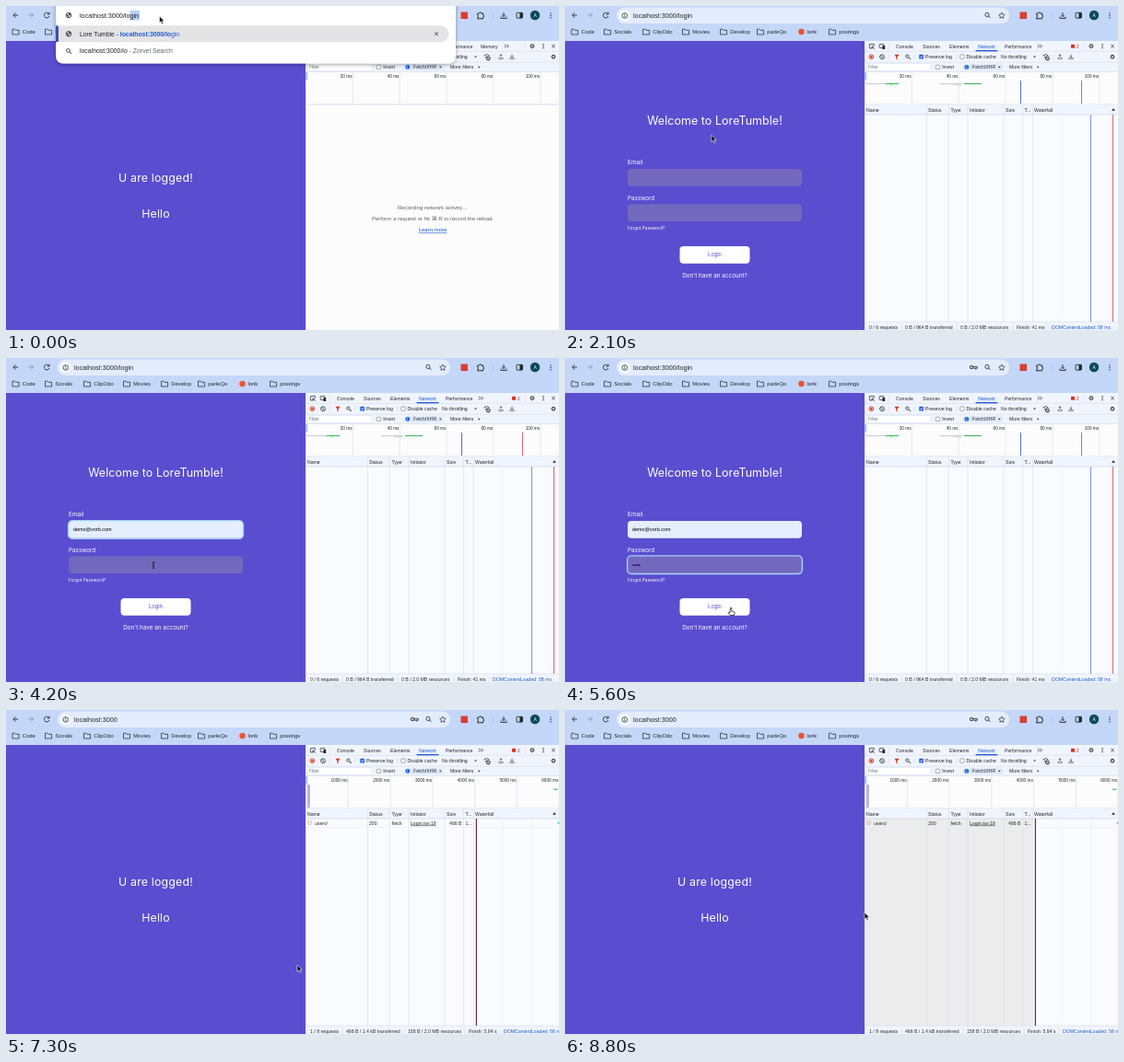
Recreate the animation shown at these times as an HTML page. Size 600 px wide and 352 px high, loop 8900 ms.

```html
<!DOCTYPE html>
<html lang="en">
<head>
<meta charset="utf-8">
<title>Login flow</title>
<style>
  html, body { margin: 0; width: 100%; height: 100%; overflow: hidden; }
  svg { display: block; width: 100vw; height: 100vh; }
  text { font-family: "Liberation Sans", Arial, sans-serif; white-space: pre; }
  .page text { font-family: Inter, "Open Sans", sans-serif; fill: #fff; }
</style>
</head>
<body>
<svg id="stage" viewBox="0 0 600 352" xmlns="http://www.w3.org/2000/svg"></svg>
<script>
const LOOP = 8900, STEP = 100;
const INK = '#26282c', BLUE = '#1a57d6', BAR = '#c4d7f8', EDGE = '#d3dcec';

// y is the vertical middle of the line of text
const text = (x, y, s, size = 5.15, fill = INK, more = '') =>
  `<text x="${x}" y="${y + size * .36}" font-size="${size}" fill="${fill}" ${more}>${s}</text>`;
const mid = 'text-anchor="middle"';
const rect = (x, y, w, h, fill, r = 0, more = '') =>
  `<rect x="${x}" y="${y}" width="${w}" height="${h}" fill="${fill}" rx="${r}" ${more}/>`;
const line = (d, stroke = INK, width = .8, more = '') =>
  `<path d="${d}" fill="none" stroke="${stroke}" stroke-width="${width}" ${more}/>`;
const shape = (d, fill, more = '') => `<path d="${d}" fill="${fill}" ${more}/>`;
const ring = (x, y, r, stroke = INK, width = .8, fill = 'none') =>
  `<circle cx="${x}" cy="${y}" r="${r}" fill="${fill}" stroke="${stroke}" stroke-width="${width}"/>`;
const dot = (x, y, r, fill = INK) => `<circle cx="${x}" cy="${y}" r="${r}" fill="${fill}"/>`;
const vline = (x, y1, y2, stroke = EDGE, width = .6) => line(`M${x} ${y1}V${y2}`, stroke, width);
const group = (id, body, cls = '') => `<g id="${id}" class="${cls}">${body}</g>`;

const kebab = (x, y, gap = 2.4) => [-gap, 0, gap].map(d => dot(x, y + d, .7)).join('');
const cross = (x, y, r) => line(`M${x - r} ${y - r}l${2 * r} ${2 * r}m0 ${-2 * r}l${-2 * r} ${2 * r}`);
const lens = (x, y, r = 1.9) =>
  ring(x - .6, y - .6, r) + line(`M${x + .8} ${y + .8}l2 2`, INK, 1);
const caret = (x, y) => shape(`M${x - 1.3} ${y - .8}h2.6l-1.3 1.8z`, INK);
const gear = (x, y) => ring(x, y, 1.9, INK, 1) + dot(x, y, .6);
const arrowTray = (x, y, dir, s = 1) =>
  line(`M${x} ${y - 2.8 * s}v${4 * s}M${x - 1.5 * s} ${y - (dir > 0 ? .3 : 1.3) * s}l${1.5 * s} ${1.5 * dir * s}l${1.5 * s} ${-1.5 * dir * s}M${x - 2.7 * s} ${y + 1.3 * s}v${1.5 * s}h${5.4 * s}v${-1.5 * s}`, INK, .8 * s);
const globe = (x, y) => ring(x, y, 2.8, '#3c4043', .9) +
  shape(`M${x - 2.6} ${y - 1}l2 .5l1 1.4l-1 1.6zM${x} ${y - 2.6}l2.4 1.4l-.8 1.6l-1.6-1z`, '#3c4043');
const checkbox = (x, y, on) => on
  ? rect(x - 2.4, y - 2.4, 4.8, 4.8, '#1b63e0', .9) + line(`M${x - 1.3} ${y}l1 1.1l1.8-2.2`, '#fff', .8)
  : rect(x - 2.2, y - 2.2, 4.4, 4.4, '#fff', .8, 'stroke="#777" stroke-width=".6"');
const folder = x =>
  line(`M${x} 25.2h2.5l1 1.1h3.6v4.7h-7.1z`, '#30343b', .8, 'stroke-linejoin="round"');

function browser() {
  const folders = [[7, 'Code'], [42.5, 'Socials'], [84.5, 'ClipOdo'], [127.5, 'Movies'],
    [168.5, 'Develop'], [208.5, 'parleQo'], [286.5, 'postings']];
  return rect(0, 0, 600, 38, BAR) + rect(56, 1.5, 426, 17.5, '#e3ecfc', 8.7) +
    line('M13 10H8M10.4 7.4L7.8 10l2.6 2.6', INK, .9) +
    line('M24.5 10h5M27 7.4l2.6 2.6L27 12.6', '#8c9bb8', .9) +
    line('M46.6 8.6a2.8 2.8 0 1 0 .3 2.4M47 6.8v2.2h-2.2', INK, .9) +
    dot(64.8, 10.5, 6, '#f8fbff') + ring(64.8, 10.5, 2.8) + vline(64.8, 10, 12, INK, .8) + dot(64.8, 9, .5) +
    lens(458.5, 10, 2.1) +
    line('M473.9 7l1 2.1 2.3.3-1.7 1.6.4 2.3-2-1.1-2 1.1.4-2.3-1.7-1.6 2.3-.3z', INK, .7) +
    rect(493.5, 6.5, 7.5, 7.5, '#dc3c32', .6) +
    line('M511.7 8h1.8a1.1 1.1 0 0 1 2.2 0h1.9v1.9a1.1 1.1 0 0 1 0 2.2v1.7h-5.9v-1.8a1 1 0 0 0 0-2z', INK, 1) +
    vline(528, 6, 14, '#a9c3ef', .8) + arrowTray(540, 10.2, 1, 1.15) +
    rect(554, 7.3, 6.4, 5.8, 'none', .7, `stroke="${INK}" stroke-width=".9"`) + rect(557.4, 7.3, 3, 5.8, INK) +
    dot(574, 10, 5.2, '#0d4a58') + text(574, 10, 'A', 4.8, '#fff', mid) + kebab(591, 10.3) +
    folders.map(([x, name]) => folder(x) + text(x + 10.8, 28, name, 5.9)).join('') +
    dot(256.5, 28, 3.3, '#e8583c') + text(262.5, 28, 'lorik', 5.9);
}

const keyIcon = ring(441, 10, 1.7, INK, .9) + line('M442.7 9.4h4.6v1.8h-4.4M445.8 11v1.4', INK, .8);

function suggestions() {
  const [dark, grey] = ['#202124', '#5f6368'];
  return rect(54, -12, 434, 74.5, '#fff', 8, 'filter="url(#soft)"') +
    globe(68, 10) + rect(134.4, 5, 10.6, 10.5, '#b5d3fb') + text(80, 10.5, 'localhost:3000/login', 7.25, dark) +
    shape('M54 21.3H471.5a9 9 0 0 1 0 18H54z', '#e4e4e6') + shape('M54 21.3h1a2 2 0 0 1 2 2v14a2 2 0 0 1-2 2h-1z', '#3c4fa8') +
    globe(68, 30.3) + cross(467, 30.3, 1.9) +
    text(80, 30.3, `Lore Tumble<tspan> - </tspan><tspan fill="${BLUE}"><tspan font-weight="bold">localhost:3000/lo</tspan>gin</tspan>`, 6.8, dark) +
    lens(68, 49) + text(80, 49, `localhost:3000/lo<tspan fill="${grey}"> - Zorvel Search</tspan>`, 6.9, dark);
}

const loggedPage = text(162.5, 187, 'U are logged!', 12.3, '#fff', mid + ' letter-spacing=".2"') +
  text(162.5, 226, 'Hello', 12.3, '#fff', mid + ' letter-spacing=".2"');

const loginPage = text(162.5, 125, 'Welcome to LoreTumble!', 12.4, '#fff', mid + ' letter-spacing=".1"') +
  text(68, 170, 'Email', 6.5) + text(68, 208.5, 'Password', 6.3) +
  [177, 215.3].map(y => rect(68, y, 189, 18.8, '#7468be', 4)).join('') +
  text(68, 241.7, 'Forgot Password?', 4.75) +
  rect(124.5, 261, 76, 18.8, '#fff', 4) +
  text(162.5, 270.3, 'Login', 5.7, '', mid + ' style="fill:#5a4dd0"') +
  text(162.5, 292.5, "Don't have an account?", 6.35, '', mid);

const focusRing = y => rect(67.6, y - .4, 189.8, 19.6, 'none', 4.4, 'stroke="#a9d2fb" stroke-width="1.4"');
const filled = s => rect(68, 177, 189, 18.8, '#e4eefd', 4) + text(73, 186.3, s, 5.45, '#000');

function autofill() {
  return shape('M120.5 200.3l4.5-4.5l4.5 4.5z', '#fff') +
    rect(115, 199.7, 85, 38.3, '#fff', 2.5, 'filter="url(#soft)"') + rect(115, 202.3, 85, 16.6, '#e9e9eb') +
    text(121, 210.7, 'melora4073@vintu.com', 6.3) + text(121, 228, 'demo@vorb.com', 6.3);
}

function toolsFrame() {
  const tabs = [[359, 'Console'], [388, 'Sources'], [417, 'Elements'], [477, 'Performance']];
  return rect(325.3, 38, 274.7, 314, '#fcfcfd') + rect(325.3, 38, 274.7, 33.5, '#f0f4fc') +
    [49.3, 61.3, 71.5].map(y => line(`M325.3 ${y}H600`, EDGE, .6)).join('') +
    line('M334 46h-3.6v-4.6h5v2M333 44l3.2 2.8M333 44v2M333 44h2', INK, .7) +
    rect(341.2, 41.5, 4.8, 4, 'none', .4, `stroke="${INK}" stroke-width=".7"`) + rect(344.4, 43, 2.8, 4, INK, .4) +
    vline(351.5, 40.5, 47.5) +
    tabs.map(([x, s]) => text(x, 43.8, s)).join('') + text(448, 43.8, 'Network', 5.15, BLUE) + rect(445.5, 48, 24, 1.3, BLUE) +
    vline(563.5, 40.5, 47.5) + gear(571, 43.6) + kebab(583, 43.6, 1.9) + cross(594, 43.6, 1.6) +
    ring(332.3, 55.2, 2.4, '#d93025', .9) + dot(332.3, 55.2, 1.2, '#d93025') +
    ring(344, 55.2, 2.4) + line('M342.3 53.5l3.4 3.4') + vline(351.5, 52, 58.5) +
    shape('M357.5 52.8h5l-1.9 2.6v2.6h-1.2v-2.6z', '#d93025') + lens(372, 55.2, 1.6) + vline(379, 52, 58.5) +
    checkbox(386.6, 55.2, true) + text(391, 55.2, 'Preserve log') + vline(425, 52, 58.5) +
    checkbox(431, 55.2) + text(435.5, 55.2, 'Disable cache') + text(473, 55.2, 'No throttling') + caret(509.5, 55.3) +
    line('M518.5 54a4.5 4.5 0 0 1 6 0M519.8 55.7a2.6 2.6 0 0 1 3 0') + gear(523.4, 57) + vline(530, 52, 58.5) +
    arrowTray(537, 55, -1, .8) + arrowTray(549, 55, 1, .8) + gear(594, 55.2) +
    rect(327, 62.8, 70, 7.6, '#fff', 1, `stroke="${EDGE}" stroke-width=".5"`) + text(329, 66.7, 'Filter', 4.9, '#777') +
    checkbox(404.5, 66.4) + text(409.2, 66.4, 'Invert') + rect(432, 63.1, 43, 6.8, '#e1eafb', 2.5) +
    dot(435.8, 66.4, 2.4, '#1b63e0') + text(435.8, 66.4, '1', 3.6, '#fff', mid) +
    text(442, 66.4, 'Fetch/XHR') + caret(471.3, 66.5) + text(482, 66.4, 'More filters') + caret(513.2, 66.5);
}

const moreTabs = (x, s = '') => s + line(`M${x - 2} 41.8l1.8 1.8l-1.8 1.8m2.6-3.6l1.8 1.8l-1.8 1.8`);
const errorBadge = rect(549, 41.7, 4, 4, '#d93025', .7) + text(555, 43.8, '2', 5, '#c5221f');

const ruler = (first, gap, step, count) => vline(326.2, 72, 80, '#7d9be0', 1.2) +
  line('M325.3 107H600', '#c9d3e6', .7) +
  Array.from({ length: count }, (_, i) => {
    const x = first + gap * i;
    return vline(x, 71.5, 107) + text(x - .8, 76.3, `${(i + 1) * step} ms`, 4.7, INK, 'text-anchor="end"');
  }).join('');

const recording = text(463, 218.8, 'Recording network activity…', 6, '#5c5f66', mid) +
  text(463, 231, 'Perform a request or hit ⌘ R to record the reload.', 6, '#5c5f66', mid) +
  text(463, 243, 'Learn more', 6, BLUE, mid + ' text-decoration="underline"');

function table() {
  const heads = [[327, 'Name'], [394, 'Status'], [418.5, 'Type'], [439, 'Initiator'], [478, 'Size'], [498.5, 'T...'], [509, 'Waterfall']];
  return rect(325.3, 107.3, 274.7, 10.7, '#f0f4fc') + rect(325.3, 118, 274.7, 225, '#fafbfe') +
    rect(325.3, 118, 182, 225, '#ececed', 0, 'id="hover"') +
    [392.5, 416.3, 437, 475.8, 496.5, 507.3].map(x => vline(x, 107, 343)).join('') +
    [539, 570.5].map(x => vline(x, 118, 343, '#e3e8f2', .5)).join('') +
    line('M325.3 118H600', '#c9d3e6', .7) +
    heads.map(([x, s]) => text(x, 112.7, s)).join('') + shape('M593.2 113.8h3.6l-1.8-2.8z', INK) +
    rect(325.3, 343, 274.7, 9, '#f0f4fc') + line('M325.3 343H600', EDGE, .6);
}

const statusBar = (xs, parts) => parts.map((s, i) =>
  text(xs[i], 349.3, s, 5.15, i == 4 ? BLUE : INK)).join('') +
  xs.slice(1).map(x => vline(x - 4, 345.5, 352)).join('');

const idleLog = line('M326 84.5h22M407 84.5h24', '#b9bec6', .8) + line('M348 84.5h14M433 84.5h19', '#35b557', 1) +
  line('M352 86h4M421 86h9', '#8fcfa0', .6) +
  vline(494.5, 81, 106, '#3b62c4', .9) + vline(560.5, 81, 106, '#d4545a', .9) +
  vline(570.5, 118, 343, '#6d8bd6', .9) + vline(594.5, 118, 343, '#d4545a', .9) +
  statusBar([330, 369, 429, 490, 528],
    ['0 / 6 requests', '0 B / 964 B transferred', '0 B / 2.0 MB resources', 'Finish: 41 ms', 'DOMContentLoaded: 58 ms']);

const fetchLog = vline(327.9, 81, 106, '#6d8bd6', 1) + vline(329.1, 81, 106, '#a98aa8', 1) +
  line('M594 86.2h4.5', '#2bb5a0', 1.1) + line('M325.3 127.5H600', '#e3e8f2', .5) +
  vline(510.4, 118, 343, '#5f2b52', 1.2) +
  text(327.5, 122.7, '{ }', 4.6, '#e0493e') + text(335, 122.7, 'users/') + text(394, 122.7, '200') +
  text(418.5, 122.7, 'fetch') + text(439, 122.7, 'Login.tsx:19', 5.15, INK, 'text-decoration="underline"') +
  text(494.5, 122.7, '466 B', 5.15, INK, 'text-anchor="end"') + text(498.5, 122.7, '1...') +
  line('M598.8 122.7h1.2', '#2bb5a0', 2) +
  statusBar([330, 369, 436, 502, 540],
    ['1 / 8 requests', '466 B / 1.4 kB transferred', '158 B / 2.0 MB resources', 'Finish: 5.94 s', 'DOMContentLoaded: 58 ms']);

function breachDialog() {
  const pale = 'stroke="#cfd4dc" stroke-width=".8"';
  return rect(194.5, 20, 212, 141.5, '#fbfbfd', 7, 'filter="url(#soft)"') +
    shape('M194.5 76V27a7 7 0 0 1 7-7h198a7 7 0 0 1 7 7v49z', '#f0f1f4') +
    line('M206 59c6 7 12 5 17 0s9-7 15-3', '#c3c6cc', 3) + line('M316 37c9 1 14-2 17-6s6-5 12-5', '#c3c6cc', 3) +
    text(219, 49, '*', 20, '#c9ccd2', mid) +
    rect(274, 34, 41, 32, '#f7f8fa', 2, pale) + shape('M268 66h52v1.5a2 2 0 0 1-2 2h-48a2 2 0 0 1-2-2z', '#e2e5ea', pale) +
    rect(248, 28, 32, 44, '#f7f8fa', 2.5, pale) + rect(257, 25.5, 14, 6, '#e2e5ea', 1.5, pale) +
    rect(270, 46, 32, 11.5, '#fff', 1, pale) +
    text(275, 54, '***', 12, '#3a78e0', 'font-weight="bold" letter-spacing="2.2"') + vline(297.3, 48, 55.5, '#3a78e0', 1) +
    shape('M264 41.5l10.5 17.5h-21z', '#e0382d', 'stroke="#e0382d" stroke-width="2" stroke-linejoin="round"') +
    vline(264, 47, 53, '#fff', 1.6) + dot(264, 55.8, 1, '#fff') +
    shape('M388 53a2 2 0 0 1 .5-3.6a3.4 3.4 0 0 1 6.3 0a1.9 1.9 0 0 1 .6 3.6z', '#dcdfe4') +
    text(204, 91.5, 'Change your password', 7.55, '#1f1f1f', 'font-weight="bold"') +
    text(204, 109.5, 'The password you just used was found in a data breach. Zorvel', 6, '#474747') +
    text(204, 119, 'Password Manager recommends changing your password now.', 6, '#474747') +
    ring(209.6, 143.5, 3, '#333', .8) + vline(209.6, 143, 145.4, '#333', .8) + dot(209.6, 141.8, .5) +
    rect(366.5, 135, 30.5, 17, '#3f5287', 8.5) + text(381.7, 143.6, 'OK', 6, '#fff', mid + ' font-weight="bold"');
}

const pointers = {
  arrow: shape('M0 0v7.2l1.7-1.5l1.2 2.8l1.3-.6l-1.2-2.7h2.2z', '#000', 'stroke="#fff" stroke-width=".6"'),
  beam: line('M-1.5-3.6q1.5 0 1.5 1v5.2q0 1-1.5 1M1.5-3.6q-1.5 0-1.5 1v5.2q0 1 1.5 1', '#222', .8),
  hand: shape('M-.9 0q0-4 .9-4t.9 4l2.6.7q.8.3.6 1.4l-.6 2.4h-4.1l-2.3-3q.2-1 1.5-.2l.5.5z', '#fff', 'stroke="#000" stroke-width=".7" stroke-linejoin="round"')
};

const stage = document.getElementById('stage');
stage.innerHTML =
  `<defs><filter id="soft" x="-10%" y="-20%" width="120%" height="150%">
     <feDropShadow dx="0" dy="1.2" stdDeviation="2" flood-color="#000" flood-opacity=".35"/></filter></defs>` +
  rect(0, 38, 325.3, 314, '#5a4dd0') +
  group('logged', loggedPage, 'page') + group('login', loginPage, 'page') +
  group('emailPreview', filled('melora4073@vintu.com') + focusRing(177) + vline(73.3, 182.5, 190, '#000', .6)) +
  group('emailFilled', filled('demo@vorb.com')) + group('emailFocus', focusRing(177)) +
  group('passFocus', focusRing(215.3)) +
  [0, 1, 2, 3].map(i => `<circle id="key${i}" cx="${74.2 + i * 2.2}" cy="225" r=".85"/>`).join('') +
  group('autofill', autofill()) +
  toolsFrame() + group('tabsWide', moreTabs(543, text(515, 43.8, 'Memory'))) + group('tabsBadge', moreTabs(515) + errorBadge) +
  group('shortRuler', ruler(376.3, 50.9, 20, 5)) + group('longRuler', ruler(371.3, 45.75, 1000, 6)) +
  group('recording', recording) + group('table', table()) + group('idleLog', idleLog) + group('fetchLog', fetchLog) +
  browser() + group('urlLogin', text(74, 10.5, 'localhost:3000/login', 7.25)) +
  group('urlHome', text(74, 10.5, 'localhost:3000', 7.25)) + group('keyIcon', keyIcon) +
  group('suggestions', suggestions()) + group('dialog', breachDialog()) +
  group('pointer', Object.entries(pointers).map(([id, body]) => group(id, body)).join(''));

// id: list of [from, to) in ms
const visible = {
  suggestions: [[0, 300]], urlLogin: [[0, 6500]], urlHome: [[6500, LOOP]],
  logged: [[0, 400], [6500, LOOP]], login: [[400, 6500]],
  recording: [[0, 500]], table: [[500, LOOP]], idleLog: [[500, 6500]], fetchLog: [[6500, LOOP]],
  shortRuler: [[0, 6500]], longRuler: [[6500, LOOP]],
  tabsWide: [[0, 1000]], tabsBadge: [[1000, LOOP]],
  emailPreview: [[2900, 3800]], emailFocus: [[2800, 4300]], autofill: [[2800, 3800]],
  emailFilled: [[3800, 6500]], passFocus: [[4300, 6500]], keyIcon: [[4700, LOOP]],
  key0: [[4700, 6500]], key1: [[4800, 6500]], key2: [[5000, 6500]], key3: [[5100, 6500]],
  hover: [[7600, LOOP]], dialog: [[7600, 8400]],
  beam: [[200, 1200], [2400, 2900], [4100, 5300]], hand: [[5400, 6500]],
  arrow: [[0, 200], [1200, 2400], [2900, 4100], [5300, 5400], [6500, 7600], [7600, LOOP]]
};

// pointer stops: time, x, y
const path = [
  [0, 166.5, 11], [1000, 166.5, 11.5], [1800, 158, 110], [2500, 160, 187], [2900, 160, 188],
  [3200, 163, 216], [3400, 163, 217], [3700, 160, 229], [3900, 160, 229], [4200, 160, 225],
  [5100, 160, 225], [5500, 180, 275], [6500, 180, 275], [7100, 316, 277], [7400, 316, 277],
  [7900, 380, 169.5], [8000, 380, 169.5], [8200, 381, 146], [8400, 381, 146], [8700, 325, 220], [LOOP, 325, 220]
];

function pointerAt(t) {
  const i = Math.max(1, path.findIndex(p => p[0] >= t));
  const [t0, x0, y0] = path[i - 1], [t1, x1, y1] = path[i];
  const k = (t - t0) / (t1 - t0), e = k * k * (3 - 2 * k);
  return [x0 + (x1 - x0) * e, y0 + (y1 - y0) * e];
}

const parts = Object.entries(visible).map(([id, spans]) => [document.getElementById(id), spans]);
const pointer = document.getElementById('pointer');

function draw() {
  const t = Math.floor(performance.now() % LOOP / STEP) * STEP;
  for (const [part, spans] of parts)
    part.style.display = spans.some(([from, to]) => t >= from && t < to) ? '' : 'none';
  pointer.setAttribute('transform', `translate(${pointerAt(t)})`);
  requestAnimationFrame(draw);
}
draw();
</script>
</body>
</html>
```
